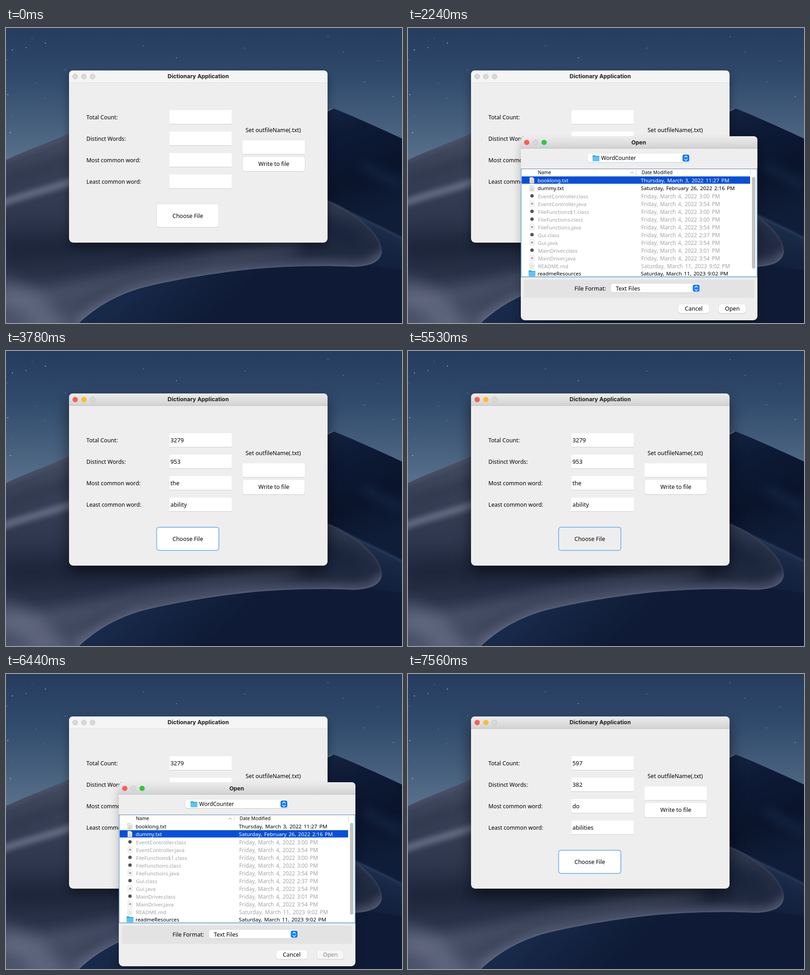
Write an HTML page that moves like this. It is 867 px wide and 646 px high and loops after 8000 ms.

```html
<!DOCTYPE html>
<html lang="en">
<head>
<meta charset="utf-8">
<title>Dictionary Application</title>
<style>
  html, body { margin: 0; width: 100%; height: 100%; overflow: hidden; background: #14233f; }
  svg { display: block; width: 867px; height: 646px; }
  text { font: 500 12.5px "Noto Sans", "Open Sans", sans-serif; fill: #000; white-space: pre; }
  .title { font: 700 12.3px Inter, "Liberation Sans", sans-serif; fill: #1c1c1c; }
  .mid { text-anchor: middle; }
  .label { font-size: 12.2px; }
  .value { font-size: 12.8px; }
  .head { font-size: 10.2px; }
  .name { font-size: 11.3px; }
  .date { font-size: 11.6px; word-spacing: 1.5px; }
  .off text { fill: #a3a3a3; font-weight: 400; }
  .off .name { font-size: 11.4px; }
  .off .date { font-size: 11.8px; }
  .off .page { opacity: .6; }
  .bar { display: none; }
  .on .bar { display: inline; }
  .on text { fill: #fff; }
  .hide { display: none; }
</style>
</head>
<body>
<svg id="stage" viewBox="0 0 867 646" xmlns="http://www.w3.org/2000/svg"></svg>
<script>
const stage = document.getElementById('stage');
const LOOP = 8000;

const rect = (x, y, w, h, fill, rx = 0, extra = '') =>
  `<rect x="${x}" y="${y}" width="${w}" height="${h}" rx="${rx}" fill="${fill}" ${extra}/>`;
const path = (d, extra) => `<path d="${d}" ${extra}/>`;
const text = (x, y, s, cls = '', extra = '') => `<text x="${x}" y="${y}" class="${cls}" ${extra}>${s}</text>`;
const dot = (x, y, r, fill, extra = '') => `<circle cx="${x}" cy="${y}" r="${r}" fill="${fill}" ${extra}/>`;
const group = (id, body, cls = '') => `<g id="${id}" class="${cls}">${body}</g>`;
const grad = (id, dir, stops) => `<linearGradient id="${id}" gradientUnits="userSpaceOnUse" ${dir}>` +
  stops.map(([o, c]) => `<stop offset="${o}" stop-color="${c}"/>`).join('') + '</linearGradient>';
const blur = (id, sd) => `<filter id="${id}" filterUnits="userSpaceOnUse" x="-100" y="-100" width="1067" height="846" ` +
  `color-interpolation-filters="sRGB"><feGaussianBlur stdDeviation="${sd}"/></filter>`;
const soft = (d, color, width, filter, opacity = 1) =>
  path(d, `fill="none" stroke="${color}" stroke-width="${width}" filter="url(#${filter})" opacity="${opacity}"`);

// Desert wallpaper
const crest = 'M704 378C762 400 823 450 823 488';
const foot = 'C822 515 792 522 760 523C690 519 600 522 530 529C420 541 330 560 290 571C230 590 190 618 160 646';
const rim = 'M823 488' + foot;
const dune = 'M0 289C40 270 95 250 138 231L300 170L600 300L' + crest.slice(1) + foot + 'H0Z';
const stars = [[14,48],[57,23],[301,39],[373,65],[130,92],[66,121],[4,146],[85,153],[738,53],[44,43],[523,44],
  [3,70],[86,33],[14,192],[785,118],[848,150],[705,19],[815,72],[10,229]];

const defs = `<defs>
  ${grad('sky', 'x1="0" y1="0" x2="0" y2="300"', [[0, '#253c5d'], [.35, '#304a6c'], [.7, '#465f7d'], [1, '#5b738d']])}
  ${grad('peak', 'x1="700" y1="180" x2="790" y2="420"', [[0, '#14233f'], [.25, '#0d1a36'], [.65, '#0a142b'], [1, '#101d38']])}
  ${grad('slope', 'x1="790" y1="410" x2="750" y2="540"', [[0, '#20324f'], [.35, '#162643'], [1, '#0f1c38']])}
  ${grad('floor', 'x1="300" y1="530" x2="420" y2="660"', [[0, '#182a4b'], [.5, '#13223f'], [1, '#0f1b36']])}
  ${grad('sand', 'x1="0" y1="230" x2="0" y2="646"', [[0, '#434c61'], [.2, '#384157'], [.42, '#2f384e'], [.6, '#222b41'], [.75, '#2a3349'], [1, '#4c546b']])}
  ${grad('barOn', 'x1="0" y1="0" x2="0" y2="27"', [[0, '#ececec'], [.4, '#e2e2e2'], [1, '#d1d1d1']])}
  ${blur('b2', 2)}${blur('b6', 6)}${blur('b10', 10)}${blur('b16', 16)}
  <clipPath id="duneClip"><path d="${dune}"/></clipPath>
</defs>`;

const wallpaper = rect(0, 0, 867, 646, 'url(#sky)') +
  stars.map(([x, y], i) => dot(x, y, i % 3 ? .7 : 1, '#d9e3ee', `opacity="${i % 2 ? .65 : .9}"`)).join('') +
  path('M600 262L700 184Q710 176 717 176C760 193 815 218 867 242V646H600Z', 'fill="url(#peak)"') +
  path('M700 184Q710 175 718 176L704 183Z', 'fill="#66768d"') +
  soft('M780 300L867 345', '#172947', 24, 'b10', .6) +
  path('M600 330L704 378C760 408 820 434 867 459V646H600Z', 'fill="url(#slope)"') +
  soft('M704 379C760 409 820 435 867 460', '#33486a', 3, 'b2', .8) +
  path('M0 646V480H700L760 515L867 530V646Z', 'fill="url(#floor)"') +
  path(dune, 'fill="url(#sand)"') +
  `<g clip-path="url(#duneClip)">` +
    soft('M0 290C40 271 95 251 138 232', '#5c647a', 8, 'b6', .5) +
    soft('M0 335L150 285', '#2f384d', 26, 'b10', .7) +
    soft('M-10 384C40 365 90 355 150 334', '#747b92', 16, 'b6', .75) +
    soft('M0 490C120 480 220 470 420 480', '#1c253a', 50, 'b16', .75) +
    soft('M600 440C690 430 730 440 780 475', '#1a253d', 55, 'b16', .9) +
    soft('M-20 600C110 590 210 555 350 530S540 500 640 478', '#6b7289', 28, 'b16', .45) +
    soft('M-20 575C50 590 90 630 90 660', '#7a8198', 60, 'b16', .45) +
    soft(rim, '#727991', 20, 'b10', .55) +
    soft(crest, '#4d566e', 5, 'b2', .5) +
    soft(rim, '#838a a1'.replace(' ', ''), 2.5, 'b2', .5) +
  '</g>';

// Shared widgets
const lights = (x, y, colors) => colors.map((c, i) =>
  dot(x + 19 * i, y, c ? 5.8 : 5.5, c || '#d9d9d9', c ? '' : 'stroke="#bfbfbf" stroke-width=".9"')).join('');
const button = (x, y, w, h, fill = '#fff', rx = 5) =>
  rect(x - .5, y - .2, w + 1, h + 1.3, '#c9c9c9', rx + .5) + rect(x, y, w, h, fill, rx);
const field = (x, y) => rect(x, y, 136, 31, '#fff') + rect(x, y + 30, 136, 1, '#cbcbcb');
const ring = (id, x, y, w, h, rx) => rect(x, y, w, h, 'none', rx, `id="${id}" stroke="#78b3e6" stroke-width="1.7"`);
const topBar = (w, fill, line) => path(`M0 27V9Q0 0 9 0H${w - 9}Q${w} 0 ${w} 9V27Z`, `fill="${fill}"`) +
  rect(0, 26, w, 1, line);
const combo = (x, y, w) => button(x, y, w, 19, '#fff', 5) + rect(x + w - 17, y + 2, 15, 15.5, '#0b7bf8', 4) +
  path(`M${x + w - 12.5} ${y + 8}l3 -3l3 3m-6 4l3 3l3 -3`, 'fill="none" stroke="#fff" stroke-width="1.5" stroke-linecap="round"');
const folder = (x, y) => path(`M${x} ${y + 2}q0 -2 2 -2h3l2 1.5h6.5q1.5 0 1.5 1.5v8.5q0 1.5 -1.5 1.5h-12q-1.5 0 -1.5 -1.5z`, 'fill="#39a8e3"') +
  rect(x, y + 3.5, 15, 9.5, '#5fc4f5', 1.3);
const page = (x, y) => `<g class="page">` +
  path(`M${x} ${y}h6.5l3 3v10h-9.5z`, 'fill="#f5f5f5" stroke="#b9b9b9" stroke-width=".8"');
const lined = (x, y) => page(x, y) + path(`M${x + 2} ${y + 4}h4m-4 2.5h6m-6 2.5h6m-6 2h5`, 'stroke="#9b9b9b" stroke-width=".8"') + '</g>';

// Main window
const labels = ['Total Count:', 'Distinct Words:', 'Most common word:', 'Least common word:'];
const results = [[], ['3279', '953', 'the', 'ability'], ['597', '382', 'do', 'abilities']];
const mainWindow =
  group('shadeIdle', rect(138, 103, 566, 377, '#000', 9, 'filter="url(#b10)" opacity=".38"')) +
  group('shadeLive', rect(138, 109, 566, 375, '#000', 9, 'filter="url(#b16)" opacity=".55"')) +
  rect(138, 93, 566, 377, '#eeeeee', 9) +
  `<g transform="translate(138 93)">` +
    group('barIdle', topBar(566, '#f5f5f5', '#e0e0e0') + lights(13.5, 13.3, [0, 0, 0])) +
    group('barLive', topBar(566, 'url(#barOn)', '#bdbdbd') + lights(13.5, 13.3, ['#fb5c54', '#fdbb2d', 0])) +
  '</g>' +
  text(420.8, 110, 'Dictionary Application', 'title mid') +
  labels.map((s, i) => text(176, 199.7 + 47 * i, s, 'label') + field(358, 180 + 47 * i) +
    text(360, 200 + 47 * i, '', 'value')).join('') +
  text(524.5, 228, 'Set outfileName(.txt)') + field(518, 246) +
  button(518, 282, 136, 32) + text(586.5, 302.3, 'Write to file', 'mid') +
  button(330, 386, 135.5, 50) + rect(330, 386, 135.5, 50, '#eeeeee', 5, 'id="pressed"') +
  ring('chooseRing', 329.8, 385.9, 136.3, 50.8, 5) + text(398, 415.5, 'Choose File', 'mid');

// File dialog
const march = t => 'Friday, March 4, 2022 ' + t + ' PM';
const files = [
  ['booklong.txt', 'Thursday, March 3, 2022 11:27 PM'],
  ['dummy.txt', 'Saturday, February 26, 2022 2:16 PM'],
  ['EventController.class', march('3:00')],
  ['EventController.java', march('3:54')],
  ['FileFunctions$1.class', march('3:00')],
  ['FileFunctions.class', march('3:00')],
  ['FileFunctions.java', march('3:54')],
  ['Gui.class', march('2:37')],
  ['Gui.java', march('3:54')],
  ['MainDriver.class', march('3:01')],
  ['MainDriver.java', march('3:54')],
  ['README.md', 'Saturday, March 11, 2023 9:02 PM'],
  ['readmeResources', 'Saturday, March 11, 2023 9:02 PM'],
];

function icon(name, y) {
  if (name.endsWith('.class')) return dot(271.5, y + 6.5, 3.8, '#555');
  if (name.endsWith('.java')) return page(267, y) + dot(271.7, y + 6.8, 2.4, '#5c6b84') + '</g>';
  return name.includes('.') ? lined(266.5, y) : folder(264, y - .5);
}

function fileRow([name, date], i) {
  const off = /class$|java$|md$/.test(name);
  const x = off ? .7 : 0;
  const y = 338 + 17 * i + (off ? .6 : -.2);
  return group('row' + i, rect(249, 325 + 17 * i, 500, 16, '#0650d8', 0, 'class="bar"') +
    icon(name, 327 + 17 * i) + text(283.8 + x, y, name, 'name') + text(509.8 + x, y, date, 'date'), off ? 'off' : '');
}

const dialog = rect(247, 251, 518, 403, '#000', 9, 'filter="url(#b10)" opacity=".24"') +
  rect(247, 237, 518, 403, '#eeeeee', 9) +
  '<g transform="translate(247 237)">' + topBar(518, 'url(#barOn)', '#bcbcbc') +
    lights(13, 13.5, ['#fb5c54', 0, '#2fc843']) + '</g>' +
  text(505, 254.5, 'Open', 'title mid') +
  combo(393, 275, 225) + folder(404, 278.5) + text(423, 289, 'WordCounter', '', 'style="font-size:12px"') +
  rect(247.5, 308.5, 517, 236.5, '#fff', 0, 'stroke="#858585"') +
  text(284.5, 320, 'Name', 'head') + text(511.5, 320, 'Date Modified', 'head') +
  path('M487 318.5l3.5 -3.5l3.5 3.5', 'fill="none" stroke="#777"') +
  path('M499.5 311v11m250 -11v11', 'stroke="#cfcfcf"') +
  files.map(fileRow).join('') +
  rect(753, 326, 7.5, 201, '#c2c2c2', 3.7) +
  group('listRing', path('M247.7 309V545H764.3V309', 'fill="none" stroke="#74addb" stroke-width="1.6"') +
    rect(247, 308, 518, 1, '#67849b')) +
  rect(254, 551, 504, 40, '#e3e3e3', 4) +
  text(364.5, 575, 'File Format:') + combo(444, 560, 196.5) + text(455, 574.5, 'Text Files') +
  button(591.5, 605, 68, 19.5) + text(625.5, 619, 'Cancel', 'mid') +
  group('openOff', button(680.5, 605, 59, 19.5, '#f6f6f6') + text(710, 619, 'Open', 'mid', 'style="fill:#858585"')) +
  group('openOn', button(680.5, 605, 59, 19.5) + text(710, 619, 'Open', 'mid')) +
  ring('openRing', 680.2, 605, 60, 19.7, 5);

stage.innerHTML = defs + wallpaper + mainWindow + group('dialog', dialog);

// time, window active, button pressed, result set, dialog shown, selected row, Open button (0 off, 1 on, 2 focused)
const steps = [
  [0, 0, 0, 0, 0, 0, 0],
  [980, 1, 1, 0, 0, 0, 0],
  [1120, 0, 1, 0, 1, 0, 0],
  [2100, 0, 1, 0, 1, 1, 0],
  [2170, 0, 1, 0, 1, 1, 1],
  [3430, 0, 1, 0, 1, 1, 2],
  [3500, 1, 1, 0, 0, 0, 0],
  [3710, 1, 1, 1, 0, 0, 0],
  [3780, 1, 0, 1, 0, 0, 0],
  [5530, 1, 1, 1, 0, 0, 0],
  [5600, 0, 1, 1, 1, 0, 0],
  [6440, 0, 1, 1, 1, 2, 0],
  [6510, 0, 1, 1, 1, 2, 1],
  [7350, 0, 1, 1, 1, 2, 2],
  [7420, 1, 1, 1, 0, 0, 0],
  [7490, 1, 1, 2, 0, 0, 0],
  [7560, 1, 0, 2, 0, 0, 0],
];
const values = [...stage.querySelectorAll('.value')];
const $ = id => document.getElementById(id);
const show = (id, on) => $(id).classList.toggle('hide', !on);
let shown;

function render([, active, pressed, set, open, row, button]) {
  show('shadeIdle', !active);
  show('barIdle', !active);
  show('shadeLive', active);
  show('barLive', active);
  show('pressed', pressed);
  show('chooseRing', active);
  values.forEach((v, i) => v.textContent = results[set][i] || '');
  show('dialog', open);
  $('row0').classList.toggle('on', row === 1);
  $('row1').classList.toggle('on', row === 2);
  show('openOff', button === 0);
  show('openOn', button > 0);
  show('openRing', button === 2);
  show('listRing', button < 2);
}

const start = performance.now();
function tick() {
  const t = (performance.now() - start) % LOOP;
  const step = steps.findLast(s => s[0] <= t);
  if (step !== shown) render(shown = step);
  requestAnimationFrame(tick);
}
tick();
</script>
</body>
</html>
```
